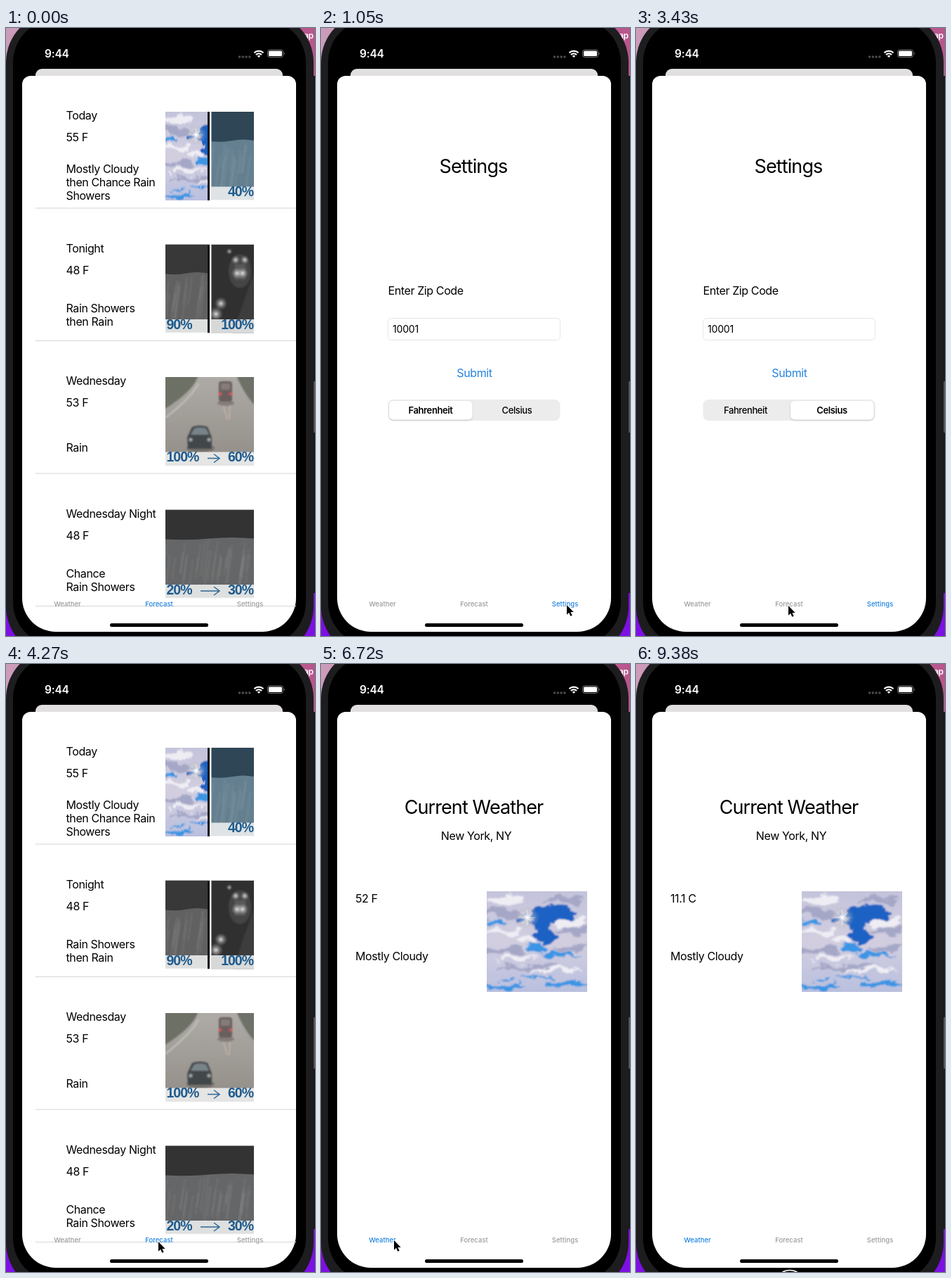
Write an HTML page that moves like this. It is 440 px wide and 864 px high and loops after 9.45 s.

```html
<!DOCTYPE html>
<html lang="en">
<head>
<meta charset="utf-8">
<title>Weather app</title>
<style>
html, body { margin: 0; width: 100%; height: 100%; overflow: hidden; background: #18161b; }
#stage { display: block; width: 440px; height: 864px; }
text { font: 400 16px Inter, "Open Sans", sans-serif; letter-spacing: -.39px; white-space: pre; }
.title { font-size: 27px; letter-spacing: -.9px; }
.mid { text-anchor: middle; }
.tab { font-size: 9.5px; font-weight: 500; letter-spacing: .04px; fill: #9b9b9b; text-anchor: middle; }
.tab.on { fill: #1b82e0; }
.seg { font-size: 13px; font-weight: 500; text-anchor: middle; }
.seg.on { font-weight: 600; }
.pct { font: 700 19.5px "Liberation Sans", Arial, sans-serif; letter-spacing: -1px; fill: #1f5b8d; }
</style>
</head>
<body>
<svg id="stage" viewBox="0 0 440 864">
  <defs>
    <filter id="haze"><feGaussianBlur stdDeviation="1"/></filter>
    <filter id="soft" x="-40%" y="-40%" width="180%" height="180%"><feGaussianBlur stdDeviation="2.2"/></filter>
    <filter id="fluff">
      <feTurbulence type="fractalNoise" baseFrequency=".045 .07" numOctaves="4" seed="4"/>
      <feDisplacementMap in="SourceGraphic" scale="22" xChannelSelector="R" yChannelSelector="G"/>
      <feGaussianBlur stdDeviation=".9"/>
    </filter>
    <filter id="shade" x="-10%" y="-20%" width="120%" height="150%"><feDropShadow dx="0" dy="1.2" stdDeviation="1.2" flood-opacity=".2"/></filter>
    <linearGradient id="cloud" x2="0" y2="1"><stop stop-color="#bfc0da"/><stop offset=".5" stop-color="#d2cee0"/><stop offset="1" stop-color="#b3bcde"/></linearGradient>
    <linearGradient id="pink"><stop stop-color="#cc9cba"/><stop offset="1" stop-color="#b8568c"/></linearGradient>
    <linearGradient id="road" x2="0" y2="1"><stop stop-color="#aeaba6"/><stop offset="1" stop-color="#918c86"/></linearGradient>
    <radialGradient id="glow"><stop stop-color="#fff"/><stop offset=".3" stop-color="#ddd" stop-opacity=".6"/><stop offset="1" stop-color="#aaa" stop-opacity="0"/></radialGradient>
    <g id="sky"></g>
  </defs>

  <rect width="440" height="864" fill="#18161b"/>
  <rect width="440" height="68" fill="url(#pink)"/>
  <rect y="803" width="440" height="61" fill="#7d10e2"/>
  <rect x="437" y="502" width="3" height="73" fill="#555"/>
  <text x="424" y="15" fill="#fff" style="font-size:12px;font-weight:600">ap</text>
  <rect x="0" y="-22" width="438" height="915" rx="71" fill="#1d1d1f"/>
  <rect x="10" y="-12" width="417" height="889" rx="61"/>

  <text x="55" y="42" fill="#fff" style="font-weight:600;font-size:15.5px;letter-spacing:-.2px">9:44</text>
  <path d="M332.500 41h15" stroke="#4b4b4b" stroke-width="3.600" stroke-linecap="round" stroke-dasharray="0 4.800"/>
  <g fill="none" stroke="#fff" stroke-width="2.200">
    <path d="M353.500 35.200a9.300 9.300 0 0 1 13 0M355.900 38a6 6 0 0 1 8.200 0"/>
    <path d="M360 42l-2.200-2.300a3.200 3.200 0 0 1 4.400 0z" fill="#fff" stroke="none"/>
  </g>
  <rect x="372.500" y="31" width="22" height="10.500" rx="3" fill="none" stroke="#777"/>
  <rect x="374" y="32.500" width="19" height="7.500" rx="1.600" fill="#fff"/>
  <path d="M396 34.500q2 1.700 0 3.600z" fill="#777"/>

  <path d="M42 70v-3a9 9 0 0 1 9-9h334a9 9 0 0 1 9 9v3z" fill="#e2dfe0"/>
  <path d="M23 80a12 12 0 0 1 12-12h366a12 12 0 0 1 12 12v730a48 48 0 0 1-48 48h-294a48 48 0 0 1-48-48z" fill="#fff"/>

  <g id="forecast"></g>

  <g id="settings">
    <text class="title mid" x="217" y="206">Settings</text>
    <text x="95.500" y="379">Enter Zip Code</text>
    <rect x="95.500" y="412.500" width="245" height="31" rx="5" fill="#fff" stroke="#e6e6e6"/>
    <text x="102" y="433" style="font-size:14px;letter-spacing:-.2px">10001</text>
    <text class="mid" x="218.500" y="496" fill="#2484df">Submit</text>
    <rect x="95.500" y="528" width="245" height="30" rx="7.500" fill="#ececec"/>
    <rect id="thumb" y="530" width="118.500" height="26.500" rx="6" fill="#fff" filter="url(#shade)"/>
    <text class="seg" x="156" y="547.500">Fahrenheit</text>
    <text class="seg" x="279" y="547.500">Celsius</text>
  </g>

  <g id="weather">
    <text class="title mid" x="217.500" y="213">Current Weather</text>
    <text class="mid" x="221" y="250">New York, NY</text>
    <text id="now" x="49" y="339"></text>
    <text x="49" y="421">Mostly Cloudy</text>
    <svg x="236" y="323" width="143" height="143" viewBox="0 0 142 142"><use href="#sky"/></svg>
  </g>

  <text class="tab" x="87.500" y="822">Weather</text>
  <text class="tab" x="218" y="822">Forecast</text>
  <text class="tab" x="347.500" y="822">Settings</text>
  <rect x="148" y="846" width="140" height="5" rx="2.500"/>

  <g id="ring" fill="none">
    <circle r="21" stroke="#000" stroke-width="3"/>
    <circle r="21" stroke="#fff" stroke-width="1.500"/>
  </g>
  <g id="cursor">
    <path transform="scale(.88)" d="M0 0V15.500L3.500 12.300 6 18 8.700 16.900 6.200 11.300H11Z" stroke="#fff" stroke-width="1.400" paint-order="stroke"/>
  </g>
</svg>

<script>
const $ = id => document.getElementById(id);
const LOOP = 9450, STEP = 70;

let seed = 7;
const rnd = () => (seed = seed * 16807 % 2147483647) / 2147483647;
const box = (x, y, w, h, fill) => `<rect x="${x}" y="${y}" width="${w}" height="${h}" fill="${fill}"/>`;
const oval = (x, y, rx, ry, fill) => `<ellipse cx="${x}" cy="${y}" rx="${rx}" ry="${ry}" fill="${fill}"/>`;
const text = (x, y, s, attr = '') => `<text x="${x}" y="${y}" ${attr}>${s}</text>`;

// Sky, 142 units square: blue gaps, then shadows and lit tops of the clouds
const sky = {
  '#1f62c4': [[92, 32, 32, 11], [78, 46, 16, 11], [84, 62, 14, 11], [50, 40, 10, 7]],
  '#3b95e4': [[14, 45, 16, 4], [72, 79, 15, 6], [104, 89, 30, 3], [26, 133, 32, 4], [112, 131, 28, 4], [70, 121, 22, 2]],
  '#a5a7c6': [[18, 30, 28, 7], [122, 56, 22, 5], [24, 84, 30, 6], [120, 80, 22, 5], [60, 106, 46, 3], [110, 13, 26, 5]],
  '#efedf4': [[24, 13, 24, 5], [22, 58, 26, 5], [58, 68, 13, 6], [122, 44, 20, 5], [44, 95, 28, 3], [98, 112, 36, 3]]
};
$('sky').innerHTML = '<g filter="url(#fluff)">' + box(-20, -20, 182, 182, 'url(#cloud)') +
  Object.entries(sky).map(([fill, spots]) => spots.map(s => oval(...s, fill)).join('')).join('') + '</g>' +
  oval(57, 37, 18, 16, 'url(#glow)') +
  '<path d="M46 37h23M57 26v23M50 30l14 14M65 30l-15 15" stroke="#fff" opacity=".45"/>';

// Dark cloud above a veil of rain
function rain(x, w, top, low, edge) {
  let s = box(x, 0, w, 125, low) +
    `<path d="M${x} 0h${w}v${edge}q${-w / 4} -3 ${-w / 2} 0t${-w / 2} 1z" fill="${top}"/>`;
  for (let i = 0; i < w / 4; i++) {
    const px = x + rnd() * w, py = edge + rnd() * 30, len = 25 + rnd() * 35;
    s += `<path d="M${px} ${py}l${-len / 7} ${len}" stroke="#fff" stroke-width="4" opacity=".035"/>`;
  }
  return s;
}
const hazy = s => `<g filter="url(#haze)">${s}</g>`;
const bar = (x, w) => box(x, 106.5, w, 20, '#f2f3f3dd');
const split = box(60, 0, 3, 126, '#111') + box(63, 0, 2.500, 126, '#eee');
const left = s => text(1.500, 120, s, 'class="pct"');
const right = s => text(125, 120, s, 'class="pct" text-anchor="end"');
const arrow = x => `<path d="M${x} 115.500H77m-8 -6l8 6l-8 6" fill="none" stroke="#2f6898" stroke-width="1.500"/>`;
const glow = (x, y, r) => oval(x, y, r, r, 'url(#glow)');

const pictures = [
  '<svg width="60" height="126" viewBox="8 0 68 142" preserveAspectRatio="none"><use href="#sky"/></svg>' +
    rain(65, 61, '#2e4656', '#647f8f', 41) + bar(65, 61) + split + right('40%'),
  rain(0, 60, '#383838', '#616161', 41) + box(65, 0, 61, 126, '#303030') +
    hazy('<path d="M126 40L96 126H126Z" fill="#3d3d3d"/>' +
      oval(106, 38, 16, 24, '#454545') + box(99, 28, 15, 22, '#585858') +
      glow(100, 22, 6) + glow(113, 22, 6) + glow(102, 41, 8) + glow(110, 41, 8) +
      glow(91, 10, 4) + glow(79, 84, 9) + glow(72, 99, 10)) +
    bar(0, 60) + bar(65, 61) + split + left('90%') + right('100%'),
  box(0, 0, 126, 126, 'url(#road)') + hazy(
    '<path d="M-5 -5H47Q44 18 -5 48Z" fill="#6d7065"/><path d="M100 -5H131V44Q112 26 100 -5Z" fill="#6d7168"/>' +
    '<path d="M47 9Q38 28 0 58" stroke="#c3c2bd" stroke-width="2" fill="none"/>' +
    '<path d="M82 38L88 60M92 38L91 60" stroke="#d3b9ae" stroke-width="2" opacity=".6"/>' +
    oval(86, 37, 12, 4, '#857e7a') + oval(50, 101, 20, 6, '#75716d') +
    '<rect x="76" y="6" width="19" height="29" rx="4" fill="#6b5e5e"/>' + box(79, 9, 13, 9, '#857c7a') +
    oval(78, 24, 2.500, 2, '#d85757') + oval(93, 24, 2.500, 2, '#d85757') +
    '<path d="M31 86L38 71Q49 67 60 71L66 86V102H32Z" fill="#43474a"/>' +
    '<path d="M36 82L41 73Q49 70 58 73L62 82Z" fill="#78838a"/>' +
    glow(36, 89, 4) + glow(62, 89, 4)) +
    bar(0, 126) + left('100%') + arrow(60) + right('60%'),
  rain(0, 126, '#333', '#656667', 41) + bar(0, 126) + left('20%') + arrow(50) + right('30%')
];

const days = [
  ['Today', '55 F', '12.8 C', ['Mostly Cloudy', 'then Chance Rain', 'Showers']],
  ['Tonight', '48 F', '8.9 C', ['Rain Showers', 'then Rain']],
  ['Wednesday', '53 F', '11.7 C', ['Rain']],
  ['Wednesday Night', '48 F', '8.9 C', ['Chance', 'Rain Showers']]
];
$('forecast').innerHTML = days.map(([name, , , lines], i) =>
  `<g transform="translate(0 ${188.5 * i})">` +
  text(85.500, 130, name) + text(85.500, 161, '', 'class="temp"') +
  lines.map((s, k) => text(85.500, 225 + 19 * k - 9.5 * (lines.length - 1), s)).join('') +
  `<svg x="227" y="119" width="126" height="126">${pictures[i]}</svg>` +
  box(42, 255.5, 371, 1, '#d6d6d6') + '</g>').join('');

const temps = document.querySelectorAll('.temp');
const tabs = document.querySelectorAll('.tab');
const segs = document.querySelectorAll('.seg');
const pages = ['weather', 'forecast', 'settings'];

// Pointer path: time, x, y
const path = [
  [0, 219, 888], [140, 219, 888], [700, 352, 823], [840, 352, 823], [1050, 350, 820],
  [1190, 350, 820], [1260, 349, 819], [1470, 349, 819], [1820, 267, 532], [1960, 272, 545],
  [2100, 274, 554], [2590, 274, 554], [2870, 231, 788], [3430, 217, 821], [4970, 217, 821],
  [5390, 115, 825], [5460, 115, 825], [5600, 150, 824], [5740, 130, 825], [5880, 110, 822],
  [6020, 110, 822], [6160, 104, 819], [7560, 104, 819], [7840, 174, 442], [7910, 174, 442],
  [8050, 174, 446], [8120, 174, 446], [8260, 277, 800], [8330, 219, 888], [LOOP, 219, 888]
];
function pointer(t) {
  const i = path.findIndex(p => p[0] > t);
  const [t0, x0, y0] = path[i - 1], [t1, x1, y1] = path[i];
  const u = (t - t0) / (t1 - t0);
  return [x0 + (x1 - x0) * u, y0 + (y1 - y0) * u];
}
const place = (el, x, y) => el.setAttribute('transform', `translate(${x} ${y})`);

function draw(now) {
  const t = Math.floor(now % LOOP / STEP) * STEP;
  const page = t < 840 ? 1 : t < 4270 ? 2 : t < 6720 ? 1 : 0;
  pages.forEach((id, i) => {
    $(id).style.display = i === page ? '' : 'none';
    tabs[i].classList.toggle('on', i === page);
  });

  temps.forEach((el, i) => el.textContent = days[i][t < 4340 ? 1 : 2]);
  $('now').textContent = t < 6790 ? '52 F' : '11.1 C';

  const u = Math.min(1, Math.max(0, (t - 2240) / 230));
  $('thumb').setAttribute('x', 97 + 123 * u * u * (3 - 2 * u));
  segs[0].classList.toggle('on', u === 0);
  segs[1].classList.toggle('on', u === 1);

  place($('cursor'), ...pointer(t));
  const tap = t >= 6580 && t < 6720, end = t >= 9380;
  $('ring').style.display = tap || end ? '' : 'none';
  place($('ring'), tap ? 105.5 : 219, tap ? 819.5 : 882.5);
}

const start = performance.now();
function frame() {
  draw(performance.now() - start);
  requestAnimationFrame(frame);
}
frame();
</script>
</body>
</html>
```
